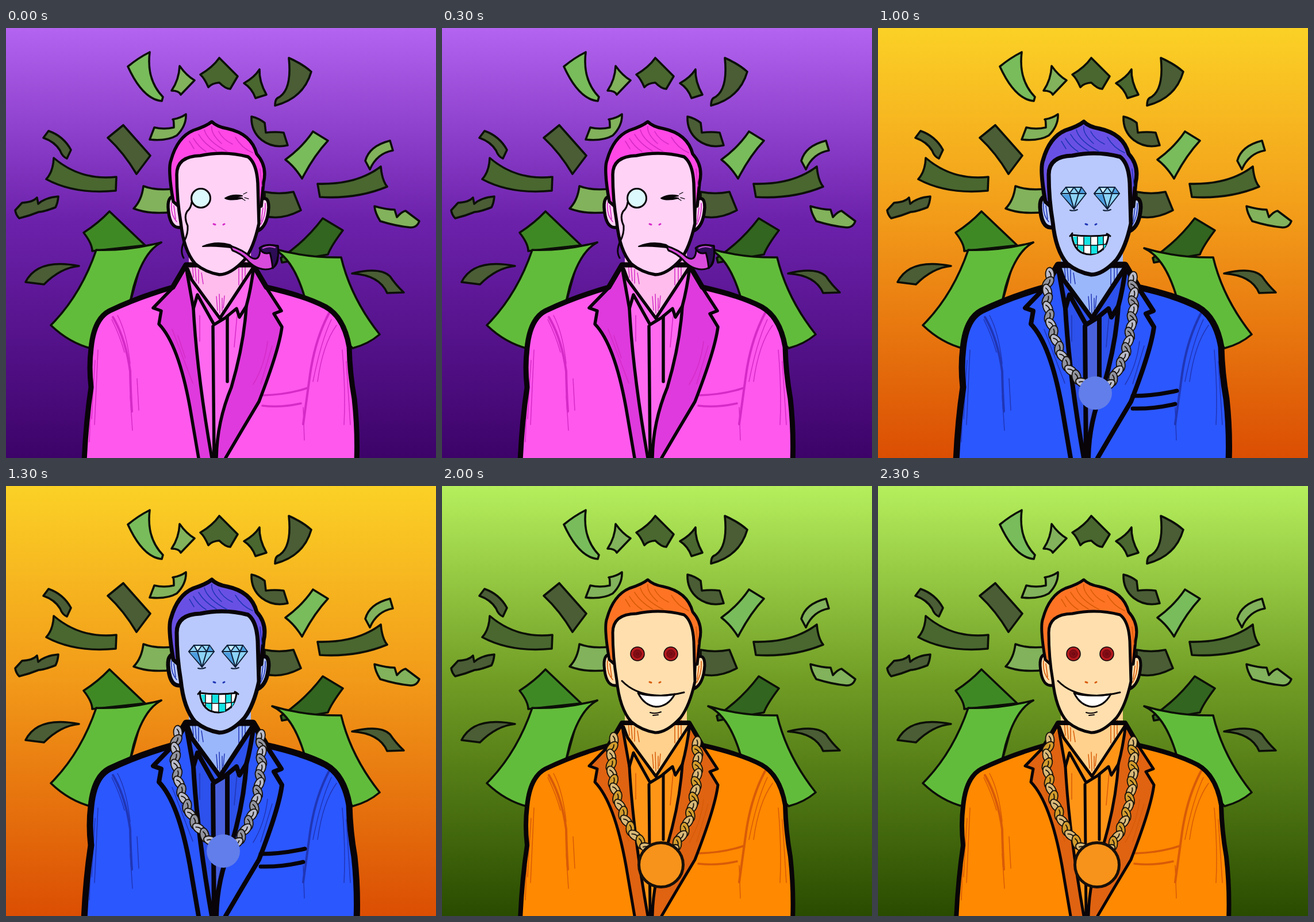
These frames come from a looping animation (748x748 px, 2.5 s). An HTML page:

```html
<!DOCTYPE html>
<html lang="en">
<head>
<meta charset="utf-8">
<title>Money portraits</title>
<style>
html, body { margin: 0; width: 100%; height: 100%; overflow: hidden; }
svg { display: block; width: 100vw; height: 100vh; }
path, circle, ellipse { stroke-linejoin: round; stroke-linecap: round; }
.ink { fill: none; stroke: #080408; }
.body { stroke-width: var(--body); }
.head { stroke: #080408; stroke-width: var(--head); }
.seam { stroke-width: var(--seam); }
.detail { fill: none; stroke: var(--detail); }
.skin { fill: var(--skin); }
.neck { fill: var(--neck); }
.hair { fill: var(--hair); }
.jacket { fill: var(--jacket); }
.lapel { fill: var(--lapel); }
.shirt { fill: var(--shirt); }
.placket { fill: var(--placket); }
</style>
</head>
<body>
<svg id="stage" viewBox="0 0 748 748">
  <defs>
    <linearGradient id="sky" x2="0" y2="1">
      <stop style="stop-color:var(--top)"/>
      <stop offset=".45" style="stop-color:var(--mid)"/>
      <stop offset="1" style="stop-color:var(--bottom)"/>
    </linearGradient>
    <linearGradient id="fire" gradientUnits="userSpaceOnUse" x1="0" y1="545" x2="0" y2="748">
      <stop stop-color="#6794dc"/>
      <stop offset=".28" stop-color="#a18d8e"/>
      <stop offset=".5" stop-color="#e08a18"/>
      <stop offset=".72" stop-color="#e05a04"/>
      <stop offset="1" stop-color="#c41400"/>
    </linearGradient>
    <path id="torso" d="M136 754Q139 685 148 625Q144 590 148 557Q153 506 180 492Q230 468 290 451L313 412H430L453 451Q520 466 556 485Q588 503 597 555Q598 600 606 645Q612 700 610 754Z"/>
    <clipPath id="suit"><use href="#torso"/></clipPath>
    <g id="gem" stroke="#102038" stroke-width="2">
      <path fill="#8cd3f7" d="M318 288L327 277H354L362 288L341 315Z"/>
      <path fill="#4c9de0" stroke="none" d="M320 290L333 290L341 313ZM354 278L361 288H349Z"/>
      <path fill="#d2f0ff" stroke="none" d="M328 279H340L334 287Z"/>
      <path fill="none" d="M318 288H362M327 277L333 288L341 277L349 288L354 277M333 288L341 315L349 288M334 317Q340 319 347 316"/>
    </g>
  </defs>

  <path fill="url(#sky)" d="M0 0H748V748H0Z"/>
  <g id="bills" stroke="#0c0f08" stroke-width="3.6"></g>
  <path data-in="3" class="ink" style="fill:#29292f" stroke-width="4" d="M305 374Q286 411 248 425Q251 446 262 452Q299 442 310 384Z"/>

  <use href="#torso" class="jacket"/>
  <g data-in="1" fill="url(#fire)">
    <path d="M137 748Q140 690 148 657L158 662Q164 650 157 632Q169 622 165 590Q163 558 179 541Q170 573 179 611Q186 634 203 649Q207 665 197 681L201 698L197 711Q211 716 216 697L213 688Q230 696 230 677Q241 674 250 661Q246 639 248 618Q252 598 257 621Q273 621 273 590Q271 561 261 543Q284 563 285 586Q275 611 287 633Q299 638 307 651Q298 668 300 690L307 678Q323 700 322 718L326 748Z"/>
    <path d="M413 748Q412 725 429 705Q427 680 445 656Q438 640 459 642Q474 631 474 612Q465 600 479 590Q497 603 492 626Q481 640 498 656Q482 679 494 691Q486 710 509 718Q514 734 529 735L525 717L538 709Q526 686 534 665L533 654Q557 657 560 640Q544 624 540 615L554 596Q550 587 542 590Q561 575 557 547Q579 565 576 588Q586 602 590 616L577 639Q590 647 605 631Q612 700 607 748Z"/>
  </g>
  <path class="lapel" d="M312 425L290 455L256 487L270 492L266 515Q300 550 320 660L335 748H358Q332 600 326 488ZM432 425L455 455L479 492L466 497L480 520Q475 560 440 650Q410 700 382 748H362Q365 695 392 625Q415 540 418 480Z"/>
  <path class="shirt" d="M314 420L326 488Q332 600 358 748H362Q365 695 392 625Q415 540 418 480L430 420L372 505Z"/>
  <path class="placket" d="M360 520L385 502V625Q368 675 366 700L364 748Z"/>
  <g id="spots" data-in="3" clip-path="url(#suit)"></g>
  <path class="neck" d="M318 390V430L372 500L426 430V385Z"/>
  <path data-in="024" class="lapel" d="M312 414L322 430L372 505L362 515L333 464L326 488ZM432 414L372 505L401 488L406 503L418 484Z" style="fill:var(--shirt)"/>

  <g class="detail" stroke-width="1.5">
    <path d="M324 409L326 434M329 415L331 440M335 420V444M340 426L343 445M405 414V447M411 412V440M416 407V432M366 467L368 491M371 463L372 496M376 470V492M380 466L378 487"/>
    <path data-in="024" d="M184 507Q198 535 206 564M194 500Q210 530 216 584M155 578Q151 630 149 680M160 560L154 690M228 610L231 665M147 660L145 720M575 517Q551 550 542 615M566 507Q548 545 534 615M585 560Q591 630 588 690M592 580L599 690M517 660L519 717M289 524L325 618M299 535L312 574M455 545Q450 587 430 620M463 553L443 619M216 640L220 700M337 500V545M402 500L397 555"/>
    <path data-in="024" stroke-width="4" d="M186 503Q208 540 216 597Q217 640 219 667M563 494Q538 540 529 602L517 689"/>
    <path data-in="04" stroke-width="3.5" d="M446 639Q490 638 525 626M446 657Q478 661 513 653"/>
    <path data-in="1" d="M187 502Q212 550 214 630M565 500Q535 550 526 640M280 525Q310 590 326 670M464 530Q460 580 437 622"/>
  </g>
  <g class="ink">
    <path data-in="2" stroke-width="7" d="M443 640Q480 640 520 631M443 662Q480 663 517 654"/>
    <path data-in="3" stroke-width="7" d="M187 503Q210 538 211 589Q208 640 215 681M570 509Q551 540 546 580Q532 635 524 702"/>
    <path class="seam" d="M290 452L256 487L270 492L266 515Q300 550 320 660L335 748M453 452L479 492L466 497L480 520Q475 560 440 650Q410 700 382 748M313 415L326 488Q332 600 358 748M431 415Q426 455 418 484Q414 550 392 625Q367 685 366 748M360 519L362 748M385 503V615"/>
    <path class="seam" stroke-linejoin="miter" d="M316 419L323 438L372 505L429 418M326 488L333 464L362 516L385 502M418 484L406 503L401 488L384 502"/>
    <use href="#torso" class="body"/>
  </g>

  <g class="head skin">
    <path d="M298 294Q281 289 282 312Q284 346 300 347H307ZM441 300Q457 289 457 312Q455 345 438 353Z"/>
    <path class="hair" d="M291 302Q281 245 287 230Q298 190 326 178Q348 171 358 163Q367 172 385 175Q427 184 436 219Q455 240 448 269L444 310H300Z"/>
    <path d="M297 255Q297 223 338 222Q380 213 421 224Q436 235 438 270L440 340Q431 382 415 403Q391 429 371 429Q347 425 329 410Q309 387 304 338Q297 298 297 255Z"/>
  </g>
  <g class="detail" stroke-width="1.6">
    <path data-in="0124" d="M326 192Q335 207 348 215M335 185Q345 202 366 214M345 177Q350 197 385 215M358 171Q356 184 375 201M370 180Q377 194 394 202M399 190Q410 209 429 217M319 197L327 210M288 304Q286 325 297 337M292 309L295 332M451 305Q452 327 443 342M447 313L444 336M442 245L445 275"/>
    <path data-in="0124" stroke-width="3" d="M361 341L364 342M378 342L380 341"/>
  </g>

  <g data-in="0" class="ink" stroke-width="3">
    <path d="M323 303Q322 313 315 319Q309 329 316 344Q317 358 310 371Q302 388 309 400"/>
    <circle cx="339" cy="296" r="16.5" style="fill:#dcf9fd"/>
    <path stroke-width="1.3" d="M413 289L419 286M415 295L422 297M411 297L416 300"/>
    <path style="fill:#080408" stroke-width="2" d="M381 296Q395 288 411 292L398 294L411 296Q391 301 381 296ZM342 380Q365 370 390 377L398 383Q365 378 342 380Z"/>
    <path style="fill:#d94bdc" d="M390 379Q413 386 426 399Q440 407 442 388V382L473 379V400Q472 420 451 420Q433 419 419 403Q408 392 394 387Z"/>
    <path style="fill:#2c0c55" d="M441 383Q450 374 473 379Q476 405 464 418Q462 400 459 391Q447 395 441 383Z"/>
    <path style="stroke:#c84fd7" stroke-width="2" d="M447 383Q457 378 468 382"/>
  </g>

  <g data-in="1" class="ink" stroke-width="3">
    <path style="fill:#080408" stroke-width="1" d="M298 290L320 291L316 302ZM437 291L417 291L420 302Z"/>
    <path d="M358 297Q367 290 377 297"/>
    <g style="fill:#f7931a"><circle cx="337" cy="299.500" r="21.500"/><circle cx="398" cy="299.500" r="21.500"/></g>
    <path style="fill:#170608" d="M336 365Q370 369 403 360Q397 382 370 384Q345 381 336 365Z"/>
    <path style="fill:#fff" stroke-width="1" d="M341 367Q370 370 399 363L393 373Q367 377 345 373Z"/>
    <path style="fill:#b9e7f2;stroke:#4aa3b7" stroke-width="1.500" d="M349 382Q371 386 398 374Q395 394 382 397Q377 402 380 411Q375 421 367 414Q366 400 361 394Q351 394 349 382ZM385 413Q376 445 386 447Q395 442 387 413Z"/>
  </g>

  <g data-in="2" class="ink" stroke-width="3">
    <use href="#gem"/><use href="#gem" x="58"/>
    <path style="fill:#fff" d="M337 360Q341 394 370 394Q398 391 401 360Q370 364 337 360Z"/>
    <path style="fill:#13e4e4" stroke="none" d="M339 363H347V376H343ZM358 363H370V377H358ZM382 363H392V377H382ZM347 377H358V390Q350 387 347 381ZM370 377H382V392L370 393ZM392 377H397L392 386Z"/>
    <path stroke-width="1.500" d="M342 377Q370 380 397 376M347 363V384M358 364V391M370 364V394M382 363V392M392 362V386"/>
    <path d="M334 362Q336 360 338 357M398 358Q401 359 404 362"/>
  </g>

  <g data-in="3" class="ink" stroke-width="4">
    <path style="fill:#26262d" d="M286 283Q310 253 360 253Q410 252 440 266Q462 286 461 313Q462 329 452 332Q411 337 391 319Q368 309 348 322Q314 347 291 340Q278 322 280 304Q280 292 286 283Z"/>
    <path style="fill:#100b0e;stroke:none" d="M405 258Q445 260 458 294Q463 328 450 330Q409 333 390 316Q371 309 348 319L368 296Q421 283 405 258Z"/>
    <path style="fill:#42434a;stroke:none" d="M302 298Q322 265 372 255Q402 253 405 266Q399 282 361 286Q340 291 340 302Q369 290 393 292Q360 301 345 310Q328 318 318 311Q332 285 302 298Z"/>
    <path stroke-width="2.500" d="M372 317V327M360 348Q373 354 385 348M349 390Q365 395 378 390"/>
    <path stroke-width="3" d="M341 385Q344 376 364 380Q387 383 402 376"/>
    <path style="fill:#fb0808" d="M295 172Q299 208 311 229L297 262Q278 237 283 207Q292 190 295 172ZM432 175Q430 205 418 227L437 257Q449 233 445 203Q435 191 432 175Z"/>
    <path stroke-width="22" stroke-linecap="butt" d="M603 574Q610 535 598 467Q588 370 651 315"/>
    <path style="fill:#fb0808" stroke-width="7" d="M637 294L686 288L662 336L656 320L643 310Z"/>
    <path style="stroke:#fb0808" stroke-width="11" d="M603 567Q609 533 598 467Q588 370 653 313"/>
  </g>

  <g data-in="4" class="ink" stroke-width="3">
    <g style="fill:#b31a1e" stroke-width="1.500"><circle cx="340" cy="292" r="12"/><circle cx="398" cy="292" r="12"/></g>
    <g style="fill:#830d15;stroke:#650710" stroke-width="1"><circle cx="340" cy="292" r="7"/><circle cx="398" cy="292" r="7"/><circle cx="340" cy="292" r="2"/><circle cx="398" cy="292" r="2"/></g>
    <path style="fill:#fff" d="M341 360Q366 368 405 362Q393 384 372 384Q352 382 341 360Z"/>
    <path d="M313 339Q334 361 370 364Q393 366 421 359"/>
    <path stroke-width="2" d="M362 394Q371 397 381 393M367 399L376 398"/>
  </g>

  <g id="chain" data-in="124" stroke="#17120c" stroke-width="1.8"></g>
  <circle data-in="1" cx="380" cy="658" r="37" fill="#f7931a" stroke="#17100a" stroke-width="4"/>
  <circle data-in="2" cx="378" cy="635" r="29" fill="#627eea"/>
  <circle data-in="4" cx="381" cy="659" r="38.500" fill="#f7931a" stroke="#17100a" stroke-width="5"/>
</svg>

<script>
const stage = document.getElementById('stage');
const find = id => document.getElementById(id);

const scenes = [
  { top: '#b364f0', mid: '#6c21ab', bottom: '#3d0369', skin: '#ffd2f6', neck: '#ffbcec', hair: '#ff48e5',
    jacket: '#ff58ed', lapel: '#df3add', shirt: '#ff69f0', placket: '#ff69f0', detail: '#d52bc7', body: 9, head: 5.5, seam: 5.5 },
  { top: '#12f2fe', mid: '#07a3af', bottom: '#04545a', skin: '#ceaeaa', neck: '#c69b94', hair: '#6b0019',
    jacket: '#4b0004', lapel: '#430006', shirt: '#510007', placket: '#6d0005', detail: '#320006', body: 4.5, head: 4, seam: 3.5 },
  { top: '#fbd126', mid: '#f29a19', bottom: '#db4e03', skin: '#b9c9fd', neck: '#9bb7fb', hair: '#6950e4',
    jacket: '#2b57ff', lapel: '#2b57ff', shirt: '#2c51ec', placket: '#4a61df', detail: '#2036b5', body: 11, head: 7, seam: 8 },
  { top: '#f36e24', mid: '#a9470f', bottom: '#652607', skin: '#ebb867', neck: '#cf9a50', hair: '#553508',
    jacket: '#fbb970', lapel: '#fbb970', shirt: '#fbb970', placket: '#fbb970', detail: '#674116', body: 10, head: 5, seam: 8 },
  { top: '#b5ef5d', mid: '#719d25', bottom: '#294b00', skin: '#ffdfae', neck: '#ffd18c', hair: '#ff7424',
    jacket: '#ff8900', lapel: '#df6311', shirt: '#ff9517', placket: '#ff9517', detail: '#d85b08', body: 8, head: 5, seam: 5 }
];

const lime = '#79bc5b', pale = '#82b25b', olive = '#49672f', moss = '#4a5d35', grass = '#62bc3b';
const bills = [
  [lime, 'M212 67Q230 52 250 42Q244 90 273 120L271 127Q238 124 212 67Z'],
  [pale, 'M302 66Q314 83 328 91L304 116Q301 109 288 109Q301 90 302 66Z'],
  [olive, 'M371 52L403 84L390 106Q382 106 371 95Q358 96 352 103Q345 87 338 81Q360 68 371 52Z'],
  [olive, 'M441 72Q440 93 453 116L434 122Q428 105 414 96Q432 86 441 72Z'],
  [moss, 'M492 52Q515 62 531 76Q518 122 468 135Q468 125 472 122Q498 110 492 52Z'],
  [pale, 'M313 150Q314 170 297 187Q280 197 250 194L258 173Q275 177 292 173Q292 158 290 159Q303 157 313 150Z'],
  [moss, 'M427 154Q440 157 450 165L452 182Q468 180 483 182L490 204Q465 210 445 195Q426 180 427 154Z'],
  [moss, 'M65 191L74 179Q100 188 113 212L106 227Q98 224 94 213Q85 198 65 191Z'],
  [olive, 'M83 226Q130 266 192 259L191 283Q120 290 70 263Q82 250 83 226Z'],
  [moss, 'M204 169L251 222L227 254Q205 217 177 191Z'],
  [lime, 'M534 180L560 196Q535 223 515 262Q502 241 486 229Q515 208 534 180Z'],
  [pale, 'M668 196L673 213Q645 218 633 246L625 231Q632 205 668 196Z'],
  [olive, 'M652 241Q654 265 663 276Q610 298 546 294L542 271Q610 273 652 241Z'],
  [moss, 'M16 317L28 304Q47 303 54 295L56 306Q68 295 91 293Q90 305 86 312Q65 320 57 320Q40 327 23 331Q17 325 16 317Z'],
  [pale, 'M239 275Q260 283 290 280V320Q250 325 222 314Q236 300 239 275Z'],
  [moss, 'M450 285Q475 290 500 285L513 317Q480 335 450 327Z'],
  [pale, 'M641 310Q662 316 676 316L680 329Q689 319 695 318L719 336Q715 347 704 347Q680 345 651 336Q642 322 641 310Z'],
  ['#3f8925', 'M135 356Q160 340 180 319L242 378L150 388Q150 375 135 356Z'],
  ['#32651f', 'M551 331L586 352Q565 380 560 394L480 408L478 400Q520 372 551 331Z'],
  ['#3f8925', 'M270 373Q245 386 228 430L218 470L240 390Z'],
  [grass, 'M157 386Q210 388 270 373Q240 388 222 450L215 480L150 558Q110 548 78 517Q130 465 157 386Z'],
  [grass, 'M463 383Q520 400 583 399Q600 470 650 533Q630 550 603 557L520 470Q500 400 463 383Z'],
  [moss, 'M34 442Q55 400 127 414Q95 417 66 446Z'],
  [moss, 'M602 427Q650 415 668 432Q678 447 692 460L663 461Q650 430 602 427Z']
];
find('bills').innerHTML = bills.map(([fill, d]) => `<path fill="${fill}" d="${d}"/>`).join('');

// Curb chain: slanted links strung along each strand.
function strand(d, tilt) {
  const path = document.createElementNS('http://www.w3.org/2000/svg', 'path');
  path.setAttribute('d', d);
  const length = path.getTotalLength(), count = 15;
  let links = '';
  for (let i = 0; i < count; i++) {
    const at = length * i / (count - 1);
    const p = path.getPointAtLength(at);
    const a = path.getPointAtLength(at - 2), b = path.getPointAtLength(at + 2);
    const angle = Math.atan2(b.y - a.y, b.x - a.x) * 180 / Math.PI + (i % 2 ? tilt : -tilt * .6);
    links += `<g transform="translate(${p.x} ${p.y}) rotate(${angle})">
      <ellipse rx="12.500" ry="7.500" style="fill:var(--link${i % 2})"/>
      <path fill="none" d="M-6 1Q0 -4 7 0"/></g>`;
  }
  return links;
}
find('chain').innerHTML = strand('M299 441Q284 495 316 572Q331 609 356 629', 32)
  + strand('M443 448Q449 500 433 568Q421 608 401 633', -32);

// Leopard rosettes on a jittered grid.
let seed = 11;
const random = () => (seed = seed * 16807 % 2147483647) / 2147483647;
let spots = '';
for (let row = 0; row < 9; row++) {
  for (let col = 0; col < 14; col++) {
    const x = 128 + col * 37 + (row % 2) * 18 + random() * 12;
    const y = 458 + row * 35 + random() * 14;
    const rx = 7 + random() * 4, ry = 10 + random() * 4;
    spots += `<g transform="translate(${x} ${y}) rotate(${random() * 120 - 60})">
      <ellipse rx="${rx}" ry="${ry}" fill="#dd7b39" stroke="#0c0705" stroke-width="7"
        stroke-dasharray="${18 + random() * 14} 11" stroke-dashoffset="${random() * 40}"/></g>`;
  }
}
find('spots').innerHTML = spots;

const layers = stage.querySelectorAll('[data-in]');
let current = -1;
function show(index) {
  for (const [name, value] of Object.entries(scenes[index])) stage.style.setProperty('--' + name, value);
  const silver = index === 2;
  stage.style.setProperty('--link0', silver ? '#b9bbca' : '#d9b978');
  stage.style.setProperty('--link1', silver ? '#92949f' : '#d29c2c');
  find('chain').setAttribute('transform', silver ? 'translate(0 -12)' : '');
  for (const layer of layers) layer.style.display = layer.dataset.in.includes(index) ? '' : 'none';
}
function draw(now) {
  const index = Math.floor(now % 2500 / 500);
  if (index !== current) show(current = index);
  requestAnimationFrame(draw);
}
draw(performance.now());
</script>
</body>
</html>
```
